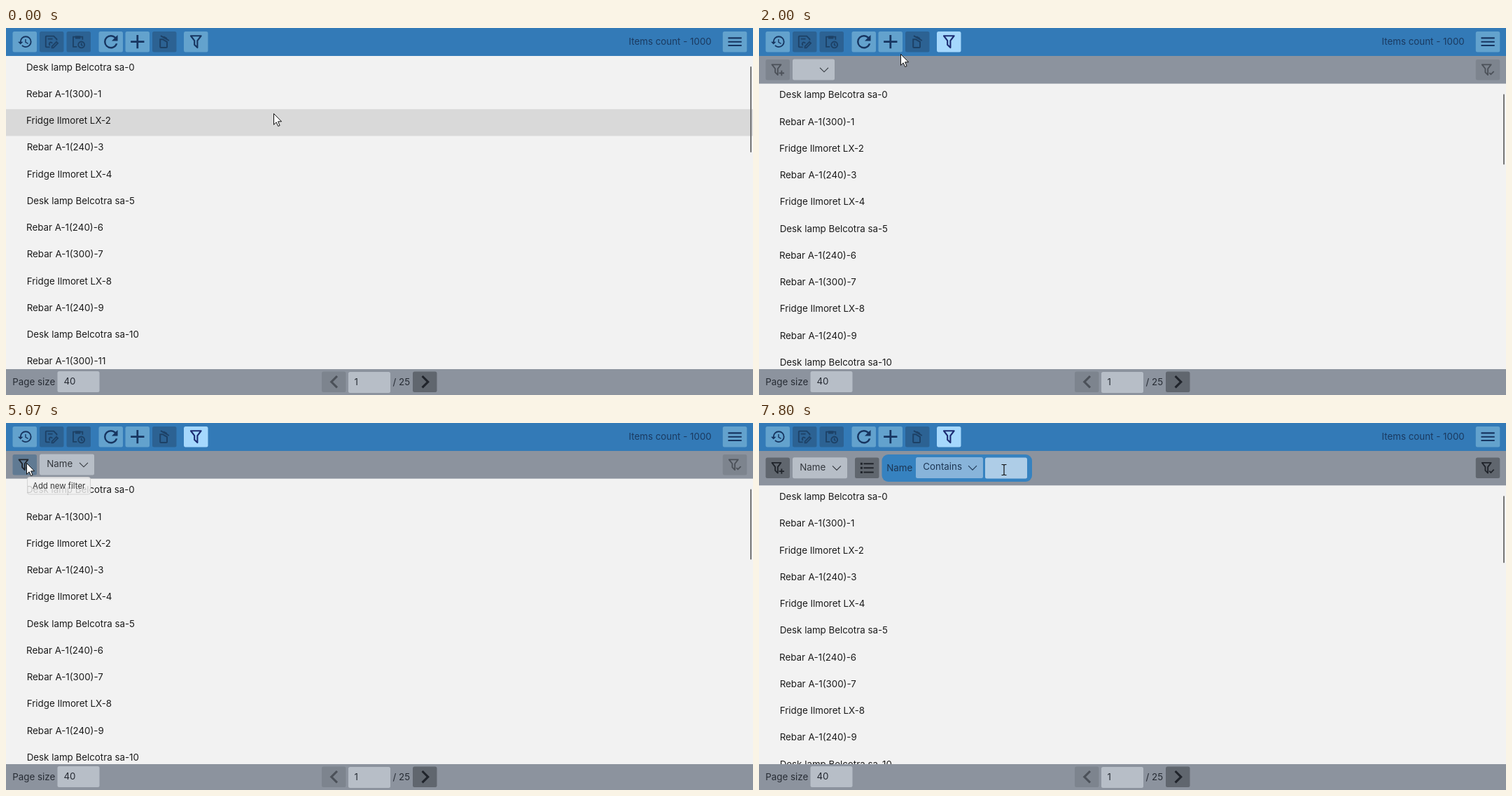
An HTML page for the animation above (8 s loop, 1067 px wide and 525 px high).

```html
<!DOCTYPE html>
<html lang="en">
<head>
<meta charset="utf-8">
<title>Item list with filters</title>
<style>
html, body { margin: 0; width: 100%; height: 100%; overflow: hidden; background: #f2f2f2; }
svg { display: block; }
text { font: 400 13.33px Inter, sans-serif; white-space: pre; }
</style>
</head>
<body>
<svg id="stage" width="1067" height="525" viewBox="0 0 1067 525"></svg>
<script>
const LOOP = 8000, STEP = 1000 / 15;
const ROW = 38.25, FOOT = 488;

const FUNNEL = 'M15,19.88C15.04,20.18 14.94,20.5 14.71,20.71C14.32,21.1 13.69,21.1 13.3,20.71L9.29,16.7C9.06,16.47 8.96,16.16 9,15.87V10.75L4.21,4.62C3.87,4.19 3.95,3.56 4.38,3.22C4.57,3.08 4.78,3 5,3H19C19.22,3 19.43,3.08 19.62,3.22C20.05,3.56 20.13,4.19 19.79,4.62L15,10.75V19.88M7.04,5L11,10.06V15.58L13,17.58V10.05L16.96,5Z';

// d: shape on a 24 unit grid, c: its centre, s: scale, line: stroked instead of filled
const ICONS = {
  history: { c: [11.5, 12], s: .93, d: 'M13.5,8H12V13L16.28,15.54L17,14.33L13.5,12.25V8M13,3A9,9 0 0,0 4,12H1L4.96,16.03L9,12H6A7,7 0 0,1 13,5A7,7 0 0,1 20,12A7,7 0 0,1 13,19C11.07,19 9.32,18.21 8.06,16.94L6.64,18.36C8.27,20 10.5,21 13,21A9,9 0 0,0 22,12A9,9 0 0,0 13,3' },
  save: { c: [12.7, 12.2], s: .98, line: 1.9, d: 'M10 20H5A1 1 0 0 1 4 19V5A1 1 0 0 1 5 4H15.6L20 8.4V10M7 8H14M10.5 17.3A2.2 2.2 0 1 1 13.4 14.6M13 21V19L19.6 12.4L21.6 14.4L15 21Z' },
  clip: { c: [13.2, 12.5], s: .95, line: 1.9, d: 'M10.5 20H5V5H19V9.5M9 4.5H15V7H9ZM22 17A4.7 4.7 0 1 1 12.6 17A4.7 4.7 0 1 1 22 17M17.3 14.3V17.3L19.2 18.4' },
  refresh: { c: [12, 12], s: 1.22, d: 'M17.65,6.35C16.2,4.9 14.21,4 12,4A8,8 0 0,0 4,12A8,8 0 0,0 12,20C15.73,20 18.84,17.45 19.73,14H17.65C16.83,16.33 14.61,18 12,18A6,6 0 0,1 6,12A6,6 0 0,1 12,6C13.66,6 15.14,6.69 16.22,7.78L13,11H20V4Z' },
  plus: { c: [12, 12], s: 1.38, d: 'M19,13H13V19H11V13H5V11H11V5H13V11H19Z' },
  bin: { c: [13.2, 11.5], s: .98, d: 'M20.37 8.91L19.37 10.64L7.24 3.64L8.24 1.91L11.28 3.66L12.64 3.29L16.97 5.79L17.34 7.16L20.37 8.91M6 19V7H11.07L18 11V19C18 20.1 17.1 21 16 21H8C6.9 21 6 20.1 6 19M8 19H16V12.2L10.46 9H8V19Z' },
  funnel: { c: [12, 12], s: 1.05, d: FUNNEL },
  addFilter: { c: [14, 12], s: .92, d: FUNNEL + 'M19,13.2H21V16.2H24V18.2H21V21.2H19V18.2H16V16.2H19Z' },
  applyFilter: { c: [14, 12], s: .92, d: FUNNEL + 'M18.7,20.6L15.6,17.5L17,16.1L18.7,17.8L22.6,13.9L24,15.3Z' },
  menu: { c: [12, 12], s: 1.07, d: 'M3,6H21V8H3ZM3,11H21V13H3ZM3,16H21V18H3Z' },
  list: { c: [11.75, 12], s: 1.02, d: 'M7,5H21V7H7ZM7,11H21V13H7ZM7,17H21V19H7ZM2.5,4.5H5.5V7.5H2.5ZM2.5,10.5H5.5V13.5H2.5ZM2.5,16.5H5.5V19.5H2.5Z' },
  prev: { c: [11.7, 12], s: 1.55, d: 'M15.41,16.58L10.83,12L15.41,7.41L14,6L8,12L14,18Z' },
  next: { c: [11.7, 12], s: 1.55, d: 'M8.59,16.58L13.17,12L8.59,7.41L10,6L16,12L10,18Z' }
};

const KINDS = {
  D: 'Desk lamp Belcotra sa-', R: 'Rebar A-1(300)-', S: 'Rebar A-1(240)-', F: 'Fridge Ilmoret LX-'
};
const ROWS = [...'DRFSFDSRFSDR'].map((kind, i) => KINDS[kind] + i);
const FIELDS = ['Id', 'Name', 'Description'];
const TESTS = ['Equals', 'Not equals', 'Contains', 'Starts with', 'Ends with'];

// Pointer path: step, x, y
const PATH = [
  [0, 382, 122], [1, 378, 118], [2, 362, 102], [4, 316, 56], [5, 298, 38], [6, 286, 30],
  [8, 276, 27], [10, 272, 26], [27, 272, 26], [28, 262, 27], [30, 202, 37], [32, 120, 55],
  [34, 82, 62], [36, 82, 62], [39, 97, 62], [46, 97, 64], [50, 94, 92], [54, 91, 111],
  [61, 91, 111], [63, 62, 74], [65, 34, 43], [66, 34, 43], [68, 30, 57], [69, 30, 57],
  [70, 29, 57], [82, 29, 57], [83, 36, 57], [84, 62, 58], [87, 230, 67], [89, 290, 65],
  [90, 295, 64], [97, 295, 64], [101, 288, 105], [105, 280, 150], [108, 280, 150],
  [112, 318, 105], [115, 343, 72], [117, 350, 67]
];

function pointer(k) {
  const i = PATH.findIndex(p => p[0] > k);
  if (i < 0) return PATH[PATH.length - 1].slice(1);
  const [k0, x0, y0] = PATH[i - 1], [k1, x1, y1] = PATH[i];
  const f = (k - k0) / (k1 - k0);
  return [Math.round(x0 + (x1 - x0) * f), Math.round(y0 + (y1 - y0) * f)];
}

const during = (k, from, to) => k >= from && k < to;
const inside = ([px, py], x, y, w, h) => px >= x && px < x + w && py >= y && py < y + h;

const box = (x, y, w, h, fill, r = 2.5, more = '') =>
  `<rect x="${x}" y="${y}" width="${w}" height="${h}" rx="${r}" fill="${fill}" ${more}/>`;
const label = (x, y, str, fill, more = '') => `<text x="${x}" y="${y}" fill="${fill}" ${more}>${str}</text>`;

function icon(name, x, y, color) {
  const { c, s, d, line } = ICONS[name];
  const paint = line ? `fill="none" stroke="${color}" stroke-width="${line}"` : `fill="${color}"`;
  return `<path transform="translate(${x} ${y}) scale(${s}) translate(${-c[0]} ${-c[1]})" d="${d}" ${paint}/>`;
}
const button = (name, x, y, fill, color) =>
  box(x, y, 34.5, 29.5, fill) + icon(name, x + 17.3, y + 14.7, color);
const chevron = (x, y, color) =>
  `<path d="M${x - 6} ${y - 3}l6 6l6 -6" fill="none" stroke="${color}" stroke-width="1.1"/>`;

function combo(x, y, w, str, fill, color) {
  return box(x, y, w, 30, fill) + label(x + 10.3, y + 18.4, str, color) + chevron(x + w - 15, y + 15.2, color);
}

function popup(x, y, items, at, pressed) {
  const rows = items.map((str, i) => {
    const top = y + 2 + i * 29;
    const over = inside(at, x, top, 102, 29);
    return (over ? box(x + 1, top, 100, 29, pressed ? '#b9c4cf' : '#dadcdf', 2) : '')
      + label(x + 11, top + 19, str, '#1c1c1c');
  });
  return box(x + .5, y + .5, 101, items.length * 29 + 3, '#f2f2f2', 4, 'stroke="#a9adb3"') + rows.join('');
}

function tooltip(x, y, w, str, opacity) {
  return `<g opacity="${opacity}">` + box(x + .5, y + .5, w - 1, 24.5, '#f2f2f2', 3, 'fill-opacity=".8" stroke="#d4d4d4"')
    + label(x + 8, y + 16.5, str, '#3a3a3a', 'style="font-size:11.43px"') + '</g>';
}

function listRows(top, hover) {
  return ROWS.map((str, i) => {
    const y = top - .3 + i * ROW;
    const back = hover && inside(hover, 0, y, 1067, ROW) ? box(0, y, 1067, ROW, '#d9d9d9', 0) : '';
    return back + label(i > 2 && i !== 6 ? 29.7 : 29, y + 21, str, '#1b1b1b');
  }).join('');
}

function toolbar(open, hover) {
  const lit = '#63a2cd', dim = '#2c6293', ink = '#173560', faint = '#1d4166';
  const fill = x => inside(hover, x, 5, 34.5, 29.5) ? '#a5d8fd' : lit;
  return box(0, 0, 1067, 40, '#337ab7', 0)
    + button('history', 9.5, 5, lit, ink)
    + button('save', 48, 5, dim, faint)
    + button('clip', 86.5, 5, dim, faint)
    + button('refresh', 132.5, 5, lit, ink)
    + button('plus', 170.5, 5, fill(170.5), ink)
    + button('bin', 209, 5, dim, faint)
    + button('funnel', 254, 5, open ? '#a5d8fd' : fill(254), open ? '#1c2c72' : ink)
    + label(889.5, 24, 'Items count - 1000', '#1b3a60')
    + button('menu', 1023.8, 5, lit, ink);
}

function chip(k) {
  const active = during(k, 95, 108), wide = k >= 108 ? 14 : 0;
  const ink = '#1d3654';
  return box(175.5, 45, 200.5 + wide, 39, active ? '#2580c5' : '#3682c0', 9)
    + label(182.3, 69, 'Name', ink)
    + combo(224, 49, 82 + wide, wide ? 'Contains' : 'Equals', active ? '#2368a3' : '#88b4da', ink)
    + box(309 + wide, 49.5, 60, 30, active ? '#7fb3de' : '#aecde7');
}

function filterBar(k, hover, height) {
  const y = height > 45 ? 49.6 : 45;
  const ready = k >= 61, added = k >= 77;
  const overAdd = inside(hover, 9.5, 45, 34.5, 30);
  const overCombo = k < 46 && inside(hover, 48, 45, 60, 30);
  const gray = '#7d848e', dark = '#60666e';
  const field = during(k, 42, 46) ? '#a2aab4' : overCombo ? '#c5cbd3' : '#b7bec7';
  return box(0, 40, 1067, height, '#8c939e', 0)
    + button('addFilter', 9.5, y, !ready ? gray : overAdd ? '#607a93' : dark, ready ? '#20242b' : '#4c5159')
    + combo(48, y - .4, k >= 62 ? 78 : 60, k >= 62 ? 'Name' : '', field, '#33373d')
    + (added ? button('list', 137, y, dark, '#20242b') + chip(k) : '')
    + button('applyFilter', 1023.8, y, added ? dark : gray, added ? '#20242b' : '#4c5159');
}

function footer() {
  const ink = '#272c34', field = '#b7bec7';
  return box(0, FOOT, 1067, 37, '#8c939e', 0)
    + label(9.3, 511, 'Page size', ink)
    + box(73.5, 491, 60, 30, field) + label(82.5, 510.3, '40', ink)
    + button('prev', 451, 491.5, '#7d848e', '#4c5159')
    + box(489, 492, 60, 30, field) + label(497.5, 511, '1', ink)
    + label(552.5, 511, '/ 25', ink)
    + button('next', 581, 491.5, '#60666e', '#20242b');
}

function cursor([x, y], k) {
  if (k >= 108 && inside([x, y], 323, 49, 60, 30))
    return `<path d="M${x - 3.5} ${y - 7.5}h2.5l1 1l1 -1h2.5M${x} ${y - 7}v14M${x - 3.5} ${y + 7.5}h2.5l1 -1l1 1h2.5" fill="none" stroke="#111" stroke-width="1.2"/>`;
  return `<path transform="translate(${x + .5} ${y + .5})" d="M0 0V15.8L3.6 12.3L6.2 18L8.6 17L6.1 11.3H11.1Z" fill="#fff" stroke="#111"/>`;
}

function scene(k) {
  const at = pointer(k), hover = pointer(Math.max(0, k - 1));
  const open = k >= 22, added = k >= 77;
  const height = added ? 49.3 : open ? 39.6 : 0;
  const top = 40 + height;
  const fieldMenu = during(k, 46, 61), testMenu = during(k, 98, 108);
  const covered = during(k, 46, 62) || during(k, 98, 109);
  const rowHover = !covered && hover[1] > top ? hover : null;
  const thumb = added ? 96 : open ? 101 : 123;
  let out = listRows(top, rowHover)
    + box(1063, top + 15, 2, thumb, '#757575', 1)
    + toolbar(open, hover)
    + (open ? filterBar(k, hover, height) : '')
    + footer();
  if (fieldMenu) out += popup(28, 76, FIELDS, at, k >= 58);
  if (testMenu) out += popup(214, 79, TESTS, at, k >= 107);
  if (during(k, 16, 28)) out += tooltip(273, 46, 72, 'Show filter', Math.min(1, (k - 15) / 3));
  if (during(k, 74, 83)) out += tooltip(30, 77, 91, 'Add new filter', Math.min(1, (k - 73) / 3));
  return out + cursor(at, k);
}

const stage = document.getElementById('stage');
let shown = -1;
function tick() {
  const k = Math.floor((performance.now() % LOOP + 4) / STEP);
  if (k !== shown) stage.innerHTML = scene(shown = k);
  requestAnimationFrame(tick);
}
tick();
</script>
</body>
</html>
```
